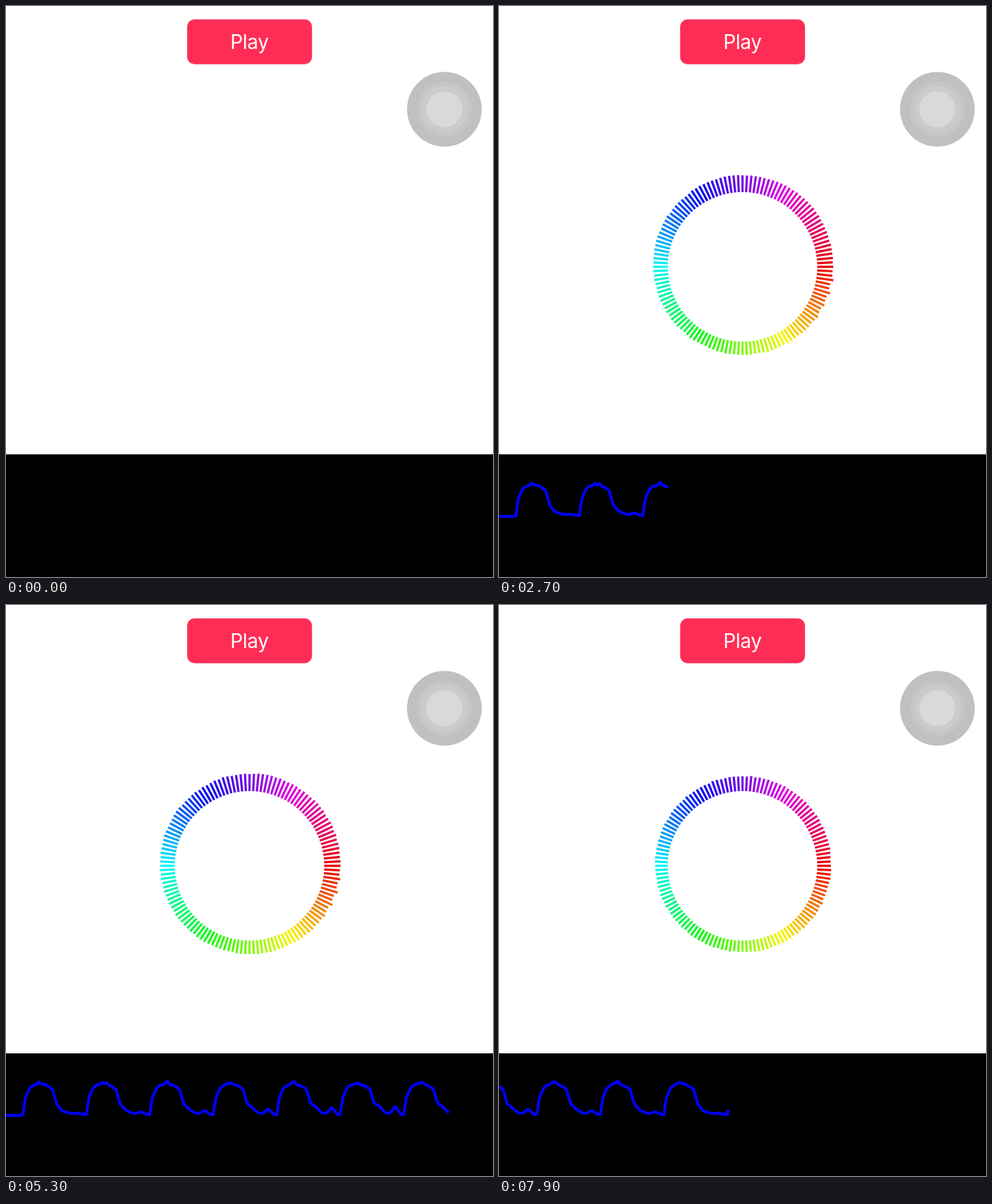
An HTML page with a canvas for the animation above (8 s loop, 691 by 810 pixels).

```html
<!DOCTYPE html>
<html lang="en">
<head>
<meta charset="utf-8">
<title>Audio visualizer</title>
<style>
  html, body { margin: 0; width: 100%; height: 100%; overflow: hidden; background: #fff; }
  svg, canvas { position: absolute; left: 0; top: 0; width: 691px; height: 810px; }
  text { font: 400 28px Inter, Roboto, sans-serif; letter-spacing: -0.3px; fill: #fff; text-anchor: middle; }
</style>
</head>
<body>
<svg viewBox="0 0 691 810">
  <rect x="257.3" y="19.3" width="176.6" height="63" rx="10" fill="#ff2d55" stroke="#e62a50" stroke-width="0.6"/>
  <text id="label" x="345.5" y="60.5">Play</text>
  <circle cx="622" cy="146.5" r="53" fill="#c1bfc1"/>
  <circle cx="622" cy="146.5" r="39" fill="#c7c5c8"/>
  <circle cx="622" cy="146.5" r="33" fill="#cccacd"/>
  <circle cx="622" cy="146.5" r="25.5" fill="#dbd8db"/>
  <rect y="636" width="691" height="174"/>
</svg>
<canvas id="stage" width="691" height="810"></canvas>
<script>
const ctx = document.getElementById('stage').getContext('2d');
const label = document.getElementById('label');
const WIDTH = 691, LOOP = 8000, STEP = 100;
const START = 1.09, SPEED = 149.2;           // sweep start in s, px per s
const FIRST_BEAT = 24, BEAT = 90.1;          // px along the sweep
const BARS = 128, INNER = 106;

// Key points: [distance into a beat, trace height] and [time, bar length]
const pulse = [[0, 0], [3, 23], [9, 37], [13, 41], [24, 46], [36, 40], [42, 36], [48, 15], [55, 5], [67, 2], [BEAT, 0]];
const level = [[1.1, 0], [1.5, 19], [2, 19.8], [3.3, 23], [5.3, 22], [6, 20], [7.9, 18.8]];

function along(points, x) {
  const i = Math.max(1, points.findIndex(p => p[0] >= x));
  const [x0, y0] = points[i - 1], [x1, y1] = points[i];
  return y0 + (y1 - y0) * (x - x0) / (x1 - x0);
}

// Seeded noise from -1 to 1
function noise(a, b) {
  const s = Math.sin(a * 12.9898 + b * 78.233) * 43758.5453;
  return 2 * (s - Math.floor(s)) - 1;
}

const bump = (x, centre, width) => Math.max(0, 1 - Math.abs(x - centre) / width);

function traceY(x) {
  if (x < FIRST_BEAT) return 724;
  const n = Math.floor((x - FIRST_BEAT) / BEAT), pos = x - FIRST_BEAT - n * BEAT;
  const echo = Math.max(1, 11 - 2 * Math.abs(n - 5));   // the tail swells, then fades
  const height = along(pulse, pos);
  const ripple = 1.8 * noise(n, Math.floor(pos / 3.4)) * bump(pos, 26, 16);
  return 723 - height - ripple - 0.7 * echo * bump(pos, 55, 8) - echo * bump(pos, 78, 8);
}

function drawRing(t) {
  const base = along(level, t);
  if (base <= 0) return;
  ctx.lineWidth = 3.2;
  for (let i = 0; i < BARS; i++) {
    const angle = i / BARS * 2 * Math.PI, c = Math.cos(angle), s = Math.sin(angle);
    const notch = i && i < 13 ? (i % 3 ? -1 : 2) * (base - 18) / 4 : 0;
    const lean = base / 22 * 3 * Math.cos(angle - 5.06);
    const outer = INNER + Math.max(1, base + lean + notch + 0.7 * noise(i, Math.floor(t * 4)));
    const light = 49 + 3.5 * Math.cos(angle - 2 * Math.PI / 3);
    ctx.strokeStyle = `hsl(${i / BARS * 360}, 93%, ${light}%)`;
    ctx.beginPath();
    ctx.moveTo(345.5 + INNER * c, 370 + INNER * s);
    ctx.lineTo(345.5 + outer * c, 370 + outer * s);
    ctx.stroke();
  }
}

function drawTrace(t) {
  const tip = (t - START) * SPEED, left = Math.floor(tip / WIDTH) * WIDTH;
  ctx.strokeStyle = '#00f';
  ctx.lineWidth = 4;
  ctx.lineJoin = 'round';
  ctx.beginPath();
  for (let x = left; x < tip; x += 2) ctx.lineTo(x - left, traceY(x));
  ctx.lineTo(tip - left, traceY(tip));
  ctx.stroke();
}

function draw() {
  const t = Math.floor(performance.now() % LOOP / STEP) * STEP / 1000;
  label.style.opacity = t >= 0.8 && t < 1 ? 0.3 : 1;
  ctx.clearRect(0, 0, WIDTH, 810);
  if (t > START) {
    drawRing(t);
    drawTrace(t);
  }
  requestAnimationFrame(draw);
}
draw();
</script>
</body>
</html>
```
